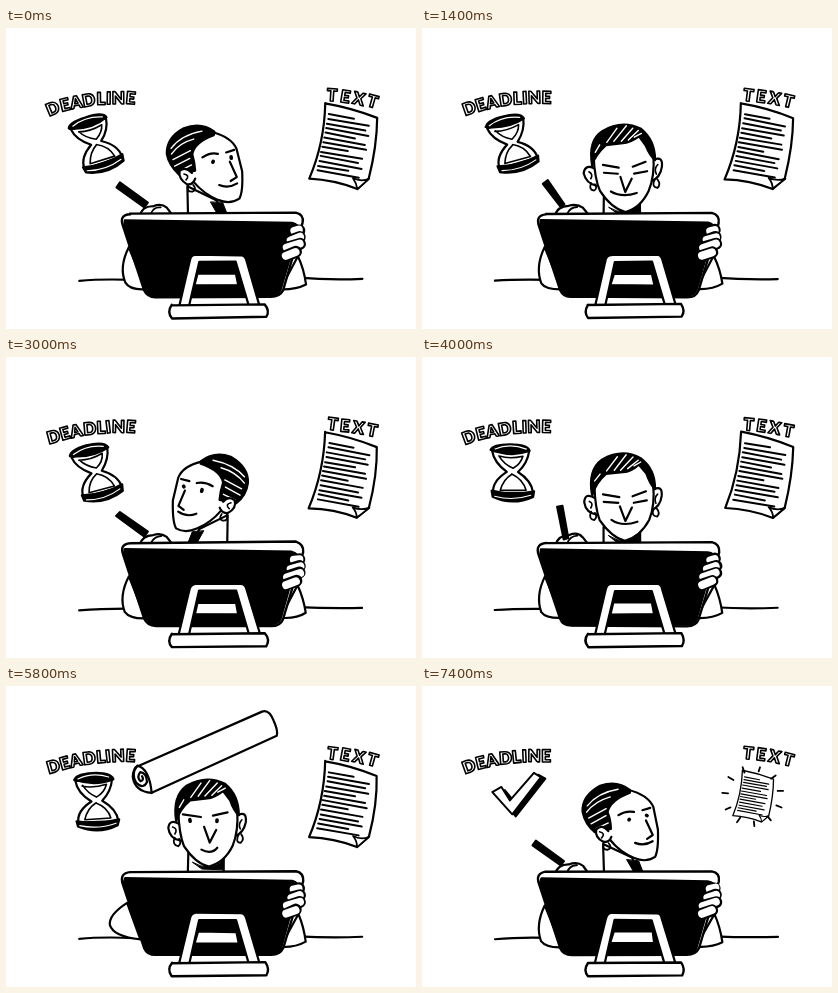
An HTML page that plays this animation: 410 by 301 pixels, repeating every 7600 ms.

```html
<!DOCTYPE html>
<html lang="en">
<head>
<meta charset="utf-8">
<title>Deadline and text</title>
<style>
  html, body { margin: 0; width: 100%; height: 100%; overflow: hidden; background: #fff; }
  svg { display: block; width: 100%; height: 100%; }
  text { font: 900 17px Lato, sans-serif; fill: #fff; stroke-width: 1.6; }
</style>
</head>
<body>
<svg id="stage" viewBox="0 0 410 301" stroke="#000" stroke-linecap="round" stroke-linejoin="round"></svg>
<script>
const STEP = 200, STEPS = 38;
const stage = document.getElementById('stage');
const BLACK = '#000', WHITE = '#fff';

let seed = 1;
const random = () => (seed = seed * 16807 % 2147483647) / 2147483647;
const jitter = amount => (random() - 0.5) * amount;
const lerp = (a, b, t) => a + (b - a) * t;

// Every absolute coordinate shifts a little per step, so the ink "boils".
const wobble = d => d.replace(/\d+(\.\d+)?/g, v => (+v + jitter(0.9)).toFixed(2));
const ink = (d, fill = 'none', width = 2.2, color = BLACK) =>
  `<path d="${wobble(d)}" fill="${fill}" stroke="${color}" stroke-width="${width}"/>`;
const group = (transform, content) => `<g transform="${transform}">${content}</g>`;

function lettering(id, text, curve, spacing) {
  const turns = [...text].map(() => jitter(8).toFixed(1)).join(' ');
  return `<path id="${id}" d="${wobble(curve)}" fill="none" stroke="none"/>
    <text letter-spacing="${spacing}" rotate="${turns}"><textPath href="#${id}">${text}</textPath></text>`;
}

function hourglass(swing) {
  return group(`rotate(${lerp(-18, 0, swing)} 90 115)`,
    ink('M70 94Q72 106 85 115Q70 124 71 136L111 136Q110 124 96 115Q106 106 107 94Z', WHITE) +
    ink('M77 99Q88 102 101 99Q99 107 91 111Q82 107 77 99Z', WHITE, 1.6) +
    ink('M90 117Q81 122 78 133L104 133Q101 122 90 117Z', WHITE, 1.6) +
    ink('M69 93Q71 87 88 87Q106 87 108 94Q90 101 69 93Z', BLACK) +
    ink('M73 92Q88 86 104 92', 'none', 1.2, WHITE) +
    ink('M70 134Q91 139 112 134L111 140Q91 149 71 140Z', BLACK) +
    ink('M73 139Q91 144 109 138', 'none', 1.1, WHITE));
}

function checkMark() {
  return ink('M75 108L83 104L92 115L116 89L123 93L94 130Z', BLACK, 2) +
    ink('M70 106L79 101L88 114L112 87L119 91L90 128Z', WHITE, 2);
}

function sheet(size) {
  let lines = '';
  for (let i = 0; i < 13; i++) {
    const x = 323 - i * 0.95, y = 86 + i * 4.7;
    const length = [25, 41, 38, 42, 30, 41, 43][i % 7];
    lines += ink(`M${x} ${y}L${x + length} ${y + length * 0.18}`, 'none', 2);
  }
  const page = ink('M319 75Q346 80 371 90Q371 118 363 151L351 161Q328 152 303 151Q318 115 319 75Z', WHITE) +
    lines + ink('M351 161Q351 155 347 150Q355 154 363 151Z', WHITE, 1.8);
  return group(`translate(331 110) scale(${size}) translate(-337 -118)`, page);
}

function rays() {
  let d = '';
  for (let i = 0; i < 11; i++) {
    const a = i * Math.PI * 2 / 11 - 1.9, c = Math.cos(a), s = Math.sin(a);
    d += `M${331 + c * 25} ${110 + s * 25}L${331 + c * 31} ${110 + s * 30}`;
  }
  return ink(d, 'none', 1.8);
}

function paperRoll(dy) {
  return group(`translate(0 ${dy})`,
    ink('M131 80L256 26Q263 23 268 35Q272 45 271 50L146 107Q129 105 127 91Q127 82 131 80Z', WHITE) +
    ink('M131 80Q143 83 146 107M131 80Q125 88 130 97Q137 104 141 96Q141 87 134 86Q130 91 135 95Q138 94 136 90'));
}

const dot = (x, y) => ink(`M${x} ${y}L${x} ${y + 1}`, 'none', 3.6);

function sideHead() {
  return ink('M181 158L182 188L218 188L210 172Z', WHITE) +
    ink('M205 174L213 188L222 188L217 175Z', BLACK, 1) +
    ink('M206 104Q226 109 231 121L236 143Q237 164 233 171Q224 177 212 172Q198 166 188 154L172 145L178 118Z', WHITE) +
    ink('M208 104Q195 94 178 100Q160 110 161 126Q163 138 173 146L189 143Q189 134 186 126Q188 114 208 107Z', BLACK) +
    ink('M165 120Q175 107 196 103M165 126Q173 115 188 111M167 132L184 123M169 138L184 130M174 143L186 137', 'none', 1.4, WHITE) +
    ink('M186 145Q180 138 174 143Q172 151 181 156Q187 157 189 151', WHITE) +
    ink('M178 146Q184 147 180 152', 'none', 1.6) +
    ink('M182 157Q180 164 186 164Q191 162 187 157', 'none', 1.8) +
    ink('M196 129Q204 124 212 126M220 124L228 122M224 134L231 149L225 153M213 157Q222 161 231 155') +
    dot(207, 133) + dot(225, 129);
}

function frontHead(eyes) {
  const face = {
    closed: ink('M181 137L197 140M211 139L224 134M182 145L196 146M212 146L225 143M198 149L203 164L210 151M189 163Q200 170 215 165'),
    open: ink('M179 139L196 140M208 140L222 136M197 149L201 165L209 153M188 162Q201 177 216 163') +
      dot(187, 147) + dot(215, 146),
    up: ink('M177 131L195 134M207 133L222 129M198 144L204 160L210 147M195 167Q205 172 211 165') +
      dot(184, 137) + dot(211, 137)
  }[eyes];
  return group(`translate(0 ${eyes === 'up' ? -3 : 0})`,
    ink('M182 170L182 192L218 192L218 170Z', WHITE) +
    ink('M187 179Q204 190 217 177L217 187L196 186Z', BLACK, 1) +
    ink('M173 141Q163 135 162 145Q164 156 175 158M232 132Q241 128 240 139Q238 150 229 153', WHITE) +
    ink('M167 144Q172 146 169 151M236 137Q232 141 234 146', 'none', 1.6) +
    ink('M169 155Q166 162 172 163Q176 160 173 156M232 152Q229 159 235 160Q239 156 235 151', 'none', 1.8) +
    ink('M172 128Q173 151 178 163Q190 181 203 184Q218 180 227 163Q233 148 231 127Q222 100 202 101Q176 104 172 128Z', WHITE) +
    ink('M170 138Q166 113 180 103Q200 91 219 101Q233 112 233 132Q228 128 224 117L217 108Q208 115 201 115L184 117Q174 126 170 138Z', BLACK) +
    ink('M185 114L195 100M192 113L204 98M199 113L211 100M206 112L216 103M212 109L219 105M173 124L178 117', 'none', 1.4, WHITE) +
    face);
}

function drawingHand(swing, drawing) {
  const tipX = drawing ? lerp(121, 138, swing) : 112;
  const tipY = drawing ? lerp(155, 149, swing) : 157;
  const endX = lerp(140, 144, swing), endY = lerp(177, 182, swing);
  const dx = endX - tipX, dy = endY - tipY, length = Math.hypot(dx, dy);
  const nx = -dy / length * 2.8, ny = dx / length * 2.8;
  return ink('M133 188Q136 178 147 178Q155 175 161 180L167 188Z', WHITE) +
    ink('M145 186Q148 179 155 179', 'none', 1.8) +
    ink(`M${tipX + nx} ${tipY + ny}L${tipX - nx} ${tipY - ny}L${endX - nx} ${endY - ny}L${endX + nx} ${endY + ny}Z`, BLACK, 2);
}

function deskAndArms(reaching) {
  return ink('M73 253Q96 251 128 252M292 250Q324 252 356 251') +
    (reaching
      ? ink('M121 217Q102 229 104 239Q108 251 134 253Z', WHITE)
      : ink('M123 219Q113 239 119 255Q124 262 140 261Z', WHITE)) +
    ink('M292 228Q298 241 300 256Q290 262 274 261Z', WHITE);
}

function tablet() {
  return ink('M124 186L290 185Q298 187 297 195L277 262Q274 269 265 269L150 269Q141 269 138 262L117 198Q113 187 124 186Z', WHITE, 2.4) +
    ink('M119 192L286 195Q293 196 292 202L275 262Q272 268 264 268L150 268Q142 268 139 261L118 197Z', BLACK, 2) +
    ink('M190 227L235 227Q239 227 240 232L254 278L243 278L230 234L193 234L183 278L173 278L184 232Q185 227 190 227Z', WHITE) +
    ink('M192 246L230 246L232 257L189 257Z', WHITE, 1.5) +
    ink('M166 277L259 276Q264 283 260 289L166 290Q161 284 166 277Z', WHITE, 2.4);
}

function grip() {
  const fingers = ['M288 203L293 202', 'M285 212L294 209', 'M281 220L294 216', 'M280 228L290 224'];
  return fingers.map(d => ink(d, 'none', 12) + ink(d, 'none', 8, WHITE)).join('');
}

const rollHeights = { 26: 80, 27: 25, 28: -17, 29: 0, 30: 4, 31: 19, 32: 75 };

function head(n) {
  if (n < 4 || n >= 33) return sideHead();
  if (n >= 13 && n < 18) return group('translate(403 0) scale(-1 1)', sideHead());
  return frontHead(n < 23 ? 'closed' : n < 26 ? 'open' : 'up');
}

function render(n) {
  seed = 7919 * (n + 1);
  const swing = (1 - Math.cos(n * Math.PI / 4)) / 2;
  const drawing = (n >= 4 && n < 13) || (n >= 18 && n < 23);
  const reaching = n >= 23 && n < 33;
  const done = n >= 33;
  const sheetSize = n < 32 ? 1 : Math.max(0.6, 1 - (n - 31) * 0.14);

  stage.innerHTML =
    lettering('deadline', 'DEADLINE', 'M43 88Q80 74 130 76', 0.4) +
    lettering('text', 'TEXT', 'M321 73Q346 74 384 84', 2.6) +
    (done ? checkMark() : hourglass(swing)) +
    group(`translate(${sheetSize === 1 ? 6 : 0} ${sheetSize === 1 ? 8 : 0})`, sheet(sheetSize)) +
    (sheetSize === 0.6 ? rays() : '') +
    (n in rollHeights ? paperRoll(rollHeights[n]) : '') +
    head(n) +
    (reaching ? '' : drawingHand(drawing ? swing : 0, drawing)) +
    deskAndArms(reaching) + tablet() + grip();
}

let shown = -1;
function tick() {
  const n = Math.floor(performance.now() / STEP) % STEPS;
  if (n !== shown) render(shown = n);
  requestAnimationFrame(tick);
}
tick();
</script>
</body>
</html>
```
